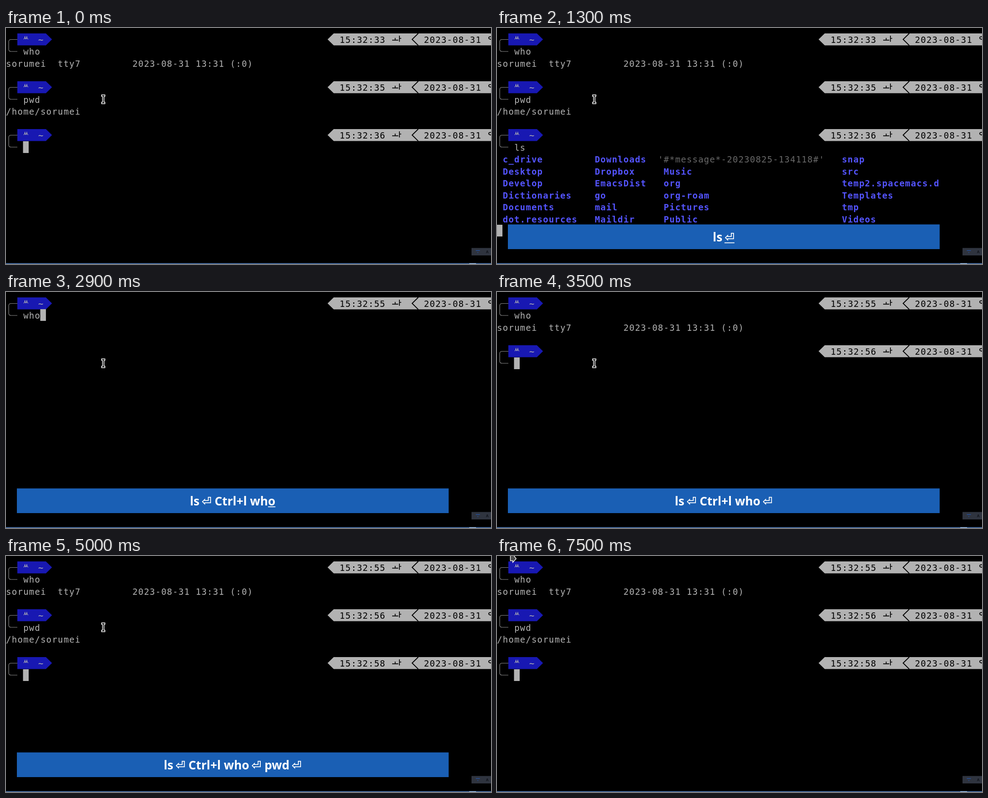
An HTML page that plays this animation: 1070 by 523 pixels, repeating every 7800 ms.

```html
<!DOCTYPE html>
<html lang="en">
<head>
<meta charset="utf-8">
<title>Terminal session</title>
<style>
  html, body { margin: 0; width: 100%; height: 100%; overflow: hidden; background: #000; }
  svg { display: block; width: 1070px; height: 523px; }
  text { white-space: pre; }
  .mono { font: 19px "DejaVu Sans Mono", "Noto Sans Mono", monospace; letter-spacing: 1.24px; }
  .dir { font-weight: bold; fill: #5454ff; }
  .dim { fill: #686868; }
  .keys { font: bold 26.3px "Noto Sans", "Open Sans", sans-serif; fill: #fff; }
  .enter { font: bold 26.3px "DejaVu Sans", sans-serif; fill: #fff; }
</style>
</head>
<body>
<svg viewBox="0 0 1070 523" xmlns="http://www.w3.org/2000/svg">
  <rect width="1070" height="523" fill="#000"/>
  <g id="term"></g>
  <g id="ibeam">
    <path d="M210.9 148.2H218.3V151.4H216.3V164.6H218.3V167.8H210.9V164.6H212.9V151.4H210.9Z" fill="#000" stroke="#fff" stroke-width="1.5"/>
  </g>
  <g id="band"></g>
  <rect x="1027" y="487.5" width="43" height="16.5" fill="#2f343f"/>
  <path d="M1036.5 492.5H1045.5V494H1036.5ZM1039.5 497H1042.5L1041 499Z" fill="#24509c"/>
  <text x="1059" y="498.5" font-family="Noto Sans, sans-serif" font-size="8" font-weight="bold" fill="#10131a">A</text>
  <rect y="521" width="1070" height="2" fill="#44689a"/>
  <rect x="1022" y="521" width="15" height="2" fill="#8fb0d8"/>
  <g id="arrow">
    <path d="M29.5 -2V10.5H34.8V14.3L42.3 6L36 -2Z" fill="#4a4a4a" stroke="#fff" stroke-width="1.4"/>
  </g>
</svg>
<script>
const LOOP = 7800, CELL = 12.68, LINE = 26.53, LEFT = -0.5, TOP = 11.9;
const GREY = '#b2b2b2', USER = 'sorumei';
const $ = id => document.getElementById(id);

// Value of the last step that has begun.
const at = (t, steps) => steps.filter(s => s[0] <= t).pop();

const colX = col => LEFT + col * CELL;
const rowY = row => Math.round(TOP + row * LINE);
const mono = (x, row, str, cls = '', fill = GREY) =>
  `<text class="mono ${cls}" x="${x + 0.6}" y="${rowY(row) + 21}" fill="${fill}">${str}</text>`;
const cell = (col, row, str, cls) => mono(colX(col), row, str, cls);
const stroke = (d, color, width) =>
  `<path d="${d}" fill="none" stroke="${color}" stroke-width="${width}"/>`;

function prompt(row, clock) {
  const marks =
    stroke('M25 13.5H11Q6 13.5 6 18.5V35Q6 40 11 40H25', '#8c8c8c', 1.2) +
    '<path d="M25 0H88L101.5 13.3L88 26.6H25Z" fill="#1818b2"/>' +
    stroke('M39.3 13Q42 10 42 6M42 8.5Q42.4 11 44 12.4Q46 10 46 6M46 8.5Q46.4 11.2 48.8 13', GREY, 1.3) +
    `<path d="M709.5 13.3L723 0H1070V26.6H723Z" fill="${GREY}"/>` +
    stroke('M909.5 0L896 13.3L909.5 26.6', '#000', 1.9) +
    stroke('M852 14.8H865.5M858.6 10V14.8M868 5V18.5M868 11H872', '#000', 1.7) +
    stroke('M1071 7.5Q1065 6.5 1065 10Q1065 13 1071 13', '#000', 1.8);
  return `<g transform="translate(0 ${rowY(row)})">${marks}</g>` +
    mono(70.5, row, '~') +
    mono(735.5, row, clock, '', '#000') +
    mono(921.5, row, '2023-08-31', '', '#000');
}

const cursor = (col, row) =>
  `<rect x="${colX(col)}" y="${rowY(row)}" width="12.5" height="26" fill="${GREY}"/>`;

const COLS = [
  [1, 'c_drive Desktop Develop Dictionaries Documents dot.resources'],
  [17, 'Downloads Dropbox EmacsDist go mail Maildir'],
  [29, '- Music org org-roam Pictures Public'],
  [60, 'snap src temp2.spacemacs.d Templates tmp Videos']
].map(([col, names]) => [col, names.split(' ')]);

const whoOut = { rows: 1, draw: r => cell(0, r, `${USER}  tty7         2023-08-31 13:31 (:0)`) };
const pwdOut = { rows: 1, draw: r => cell(0, r, '/home/' + USER) };
const lsOut = {
  rows: 6,
  draw: r => cell(28, r, "'#*message*-20230825-134118#'", 'dim') +
    COLS.map(([col, names]) =>
      names.map((n, i) => n === '-' ? '' : cell(col, r + i, n, 'dir')).join('')).join('')
};

// clock, command, time of each key, time of Enter, output
const DONE = [-1, -1, -1];
const before = [
  ['15:32:33', 'who', DONE, -200, whoOut],
  ['15:32:35', 'pwd', DONE, -200, pwdOut],
  ['15:32:36', 'ls', [600, 700], 1300, lsOut],
  ['15:32:52', '', [], Infinity]
];
const after = [
  ['15:32:55', 'who', [2600, 2800, 2900], 3300, whoOut],
  ['15:32:56', 'pwd', [4300, 4400, 4600], 4800, pwdOut],
  ['15:32:58', '', [], Infinity]
];

function terminal(t) {
  let s = '', row = 0;
  for (const [clock, cmd, keys, enter, out] of t < 2100 ? before : after) {
    const typed = cmd.slice(0, keys.filter(k => k <= t).length);
    s += prompt(row, clock) + cell(3, row + 1, typed);
    if (t < enter) return s + cursor(3 + typed.length, row + 1);
    s += out.draw(row + 2);
    row += 2 + out.rows;
    if (t < enter + 100) return s + cursor(0, row);
    row++;
  }
  return s;
}

// time, keys shown, length of the underlined tail
const BAND = [
  [0, '', 0],
  [600, 'l', 1], [700, 'ls', 1], [900, 'ls', 0],
  [1300, 'ls⏎', 1], [1500, 'ls⏎', 0],
  [2200, 'ls⏎ Ctrl+l', 6], [2400, 'ls⏎ Ctrl+l', 0],
  [2600, 'ls⏎ Ctrl+l w', 1], [2800, 'ls⏎ Ctrl+l wh', 1],
  [2900, 'ls⏎ Ctrl+l who', 1], [3200, 'ls⏎ Ctrl+l who', 0],
  [3300, 'ls⏎ Ctrl+l who⏎', 1], [3500, 'ls⏎ Ctrl+l who⏎', 0],
  [4300, 'ls⏎ Ctrl+l who⏎ p', 1], [4400, 'ls⏎ Ctrl+l who⏎ pw', 1],
  [4600, 'ls⏎ Ctrl+l who⏎ pwd', 1],
  [4800, 'ls⏎ Ctrl+l who⏎ pwd⏎', 1], [5000, 'ls⏎ Ctrl+l who⏎ pwd⏎', 0],
  [7100, '', 0]
];
const FADE = [[0, 0], [600, 0.75], [700, 1], [7000, 0.5], [7100, 0]];

const pen = document.createElement('canvas').getContext('2d');
pen.font = 'bold 26.3px "Noto Sans", "Open Sans", sans-serif';
const width = str => pen.measureText(str).width;
const ENTER = 22, GAP = 4.7;

function band(t) {
  const [, keys, tail] = at(t, BAND);
  if (!keys) return '';
  let s = '', x = 0, last = 0;
  for (const part of keys.split(/(⏎)/).filter(Boolean)) {
    if (part === '⏎') {
      x += GAP;
      last = ENTER;
      s += `<text class="enter" x="${x}" y="473">⏎</text>`;
      x += ENTER;
    } else {
      const word = part.trimStart();
      if (word !== part) x += width(' ');
      s += `<text class="keys" x="${x}" y="473">${word}</text>`;
      x += width(word);
      last = width(word.slice(-tail));
    }
  }
  if (tail) s += `<rect x="${x - last}" y="475.2" width="${last}" height="1.7" fill="#fff"/>`;
  return '<rect x="24" y="435.3" width="952.6" height="54.7" fill="#1a5fb4"/>' +
    `<g transform="translate(${500 - x / 2} 0)">${s}</g>`;
}

const shown = {};
function put(id, markup) {
  if (shown[id] === markup) return;
  shown[id] = markup;
  $(id).innerHTML = markup;
}

const POINTER = [[0, -30], [7300, -9], [7400, -4], [7500, 0]];

function draw(t) {
  put('term', terminal(t));
  put('band', band(t));
  $('band').setAttribute('opacity', at(t, FADE)[1]);
  $('ibeam').setAttribute('visibility', t < 6100 ? 'visible' : 'hidden');
  $('arrow').setAttribute('transform', `translate(0 ${at(t, POINTER)[1]})`);
}

const start = performance.now();
function tick() {
  draw((performance.now() - start) % LOOP);
  requestAnimationFrame(tick);
}
tick();
</script>
</body>
</html>
```
